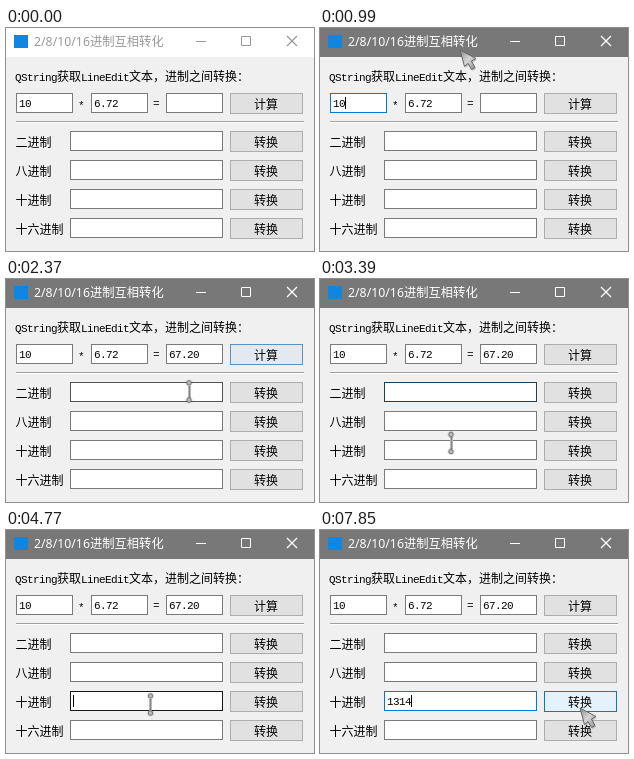
These frames come from a looping animation (308 by 223 pixels, 8000 ms). An HTML page:

```html
<!DOCTYPE html>
<html lang="zh-CN">
<head>
<meta charset="utf-8">
<title>2/8/10/16进制互相转化</title>
<style>
  html, body { margin: 0; width: 100%; height: 100%; overflow: hidden; background: #f0f0f0; }
  svg { display: block; width: 100vw; height: 100vh; }
  text { font-family: "Noto Sans CJK SC", "Noto Sans CJK", sans-serif; font-size: 12px; white-space: pre; }
  .latin { font-family: "Liberation Mono", monospace; font-size: 11px; letter-spacing: -.6px; }
  .title { font-family: "Noto Sans", "Noto Sans CJK SC", "Noto Sans CJK", sans-serif; font-size: 12.3px; }
</style>
</head>
<body>
<svg id="stage" viewBox="0 0 308 223">
  <defs>
    <linearGradient id="metal" x1="0" y1="0" x2="1" y2="1">
      <stop offset="0" stop-color="#8a8a8a"/>
      <stop offset=".5" stop-color="#d6d6d6"/>
      <stop offset="1" stop-color="#8c8c8c"/>
    </linearGradient>
  </defs>
</svg>
<script>
const LOOP = 8000;
const stage = document.getElementById('stage');

function el(tag, attrs, parent = stage) {
  const node = document.createElementNS('http://www.w3.org/2000/svg', tag);
  set(node, attrs);
  parent.appendChild(node);
  return node;
}

function set(node, attrs) {
  for (const key in attrs) node.setAttribute(key, attrs[key]);
}

function rect(x, y, width, height, fill, parent) {
  return el('rect', { x, y, width, height, fill, 'shape-rendering': 'crispEdges' }, parent);
}

// Half-width and full-width runs use different fonts.
function label(x, y, str) {
  const text = el('text', { x, y, fill: '#000' });
  for (const run of str.match(/[ -~]+|[^ -~]+/g) || []) {
    const span = el('tspan', /[ -~]/.test(run) ? { class: 'latin' } : {}, text);
    span.textContent = run;
  }
  return text;
}

function box(x, y, w, h, fill, stroke) {
  return el('rect', {
    x: x + .5, y: y + .5, width: w - 1, height: h - 1,
    fill, stroke, 'shape-rendering': 'crispEdges'
  });
}

function field(x, y, w) {
  const frame = box(x, y, w, 20, '#fff', '#7a7a7a');
  const text = el('text', { x: x + 3, y: y + 14, class: 'latin' });
  return { x, y, frame, text };
}

function button(y, str) {
  const frame = box(224, y, 73, 21, '#e1e1e1', '#adadad');
  label(248, y + 16, str);
  return frame;
}

// Title bar
rect(0, 0, 308, 223, '#f0f0f0');
const bar = rect(0, 0, 308, 29, '#fff');
rect(8, 7, 14, 13, '#0f86e0');
const title = el('text', { x: 28, y: 18, class: 'title' });
title.textContent = '2/8/10/16进制互相转化';
const controls = el('g', { fill: 'none', 'stroke-linejoin': 'bevel' });
el('path', { d: 'M190 13.5h10M235.5 8.5h9v9h-9z' }, controls);
el('path', { d: 'M281 8l10 10M291 8l-10 10', 'stroke-width': 1.3 }, controls);

// Form
label(9, 53, 'QString获取LineEdit文本，进制之间转换：');
const fields = { a: field(10, 65, 57), b: field(85, 65, 57), sum: field(160, 65, 57) };
label(72, 81, '*');
label(147, 79, '=');
const buttons = { calc: button(65, '计算') };
rect(10, 93, 288, 1, '#a0a0a0');
rect(10, 94, 288, 1, '#fff');
['二', '八', '十', '十六'].forEach((name, i) => {
  const y = 103 + i * 29;
  const key = ['bin', 'oct', 'dec', 'hex'][i];
  label(9.5, y + 16, name + '进制');
  fields[key] = field(64, y, 153);
  buttons[key] = button(y, '转换');
});
const caret = rect(0, 0, 1, 12, '#000');

// Pointers
const arrow = el('g', {});
const arrowPath = 'M0 0L16 8.5L11.5 11L15 17.5L11.5 19.5L8 13.5L4.5 16.5Z';
el('path', { d: arrowPath, transform: 'translate(1 1.5)', fill: '#000', opacity: .18 }, arrow);
el('path', { d: arrowPath, fill: 'url(#metal)', stroke: '#666', 'stroke-linejoin': 'round' }, arrow);

const beam = el('g', {});
rect(-1.5, -6, 3, 12, '#b8b8b8', beam);
rect(-.5, -6, 1, 12, '#858585', beam);
for (const cy of [-8.6, 8.6]) {
  el('circle', { cx: 0, cy, r: 3.5, fill: '#000', opacity: .12 }, beam);
  el('circle', { cx: 0, cy, r: 2.2, fill: '#b8b8b8', stroke: '#787878' }, beam);
}

// Border and fill looks
const BLUE = '#0078d7', DARK = '#171717', FADE = '#555';
const HOVER = ['#e5f1fb', BLUE], PRESSED = ['#cce4f7', '#005499'];
const HALF = ['#e3e9ee', '#5793c3'];

// Each step changes only the listed parts of the state.
const start = {
  active: false, arrow: null, beam: null, caret: null,
  edge: {}, look: {}, text: { a: '10', b: '6.72' }
};
const changes = [
  [0, {}],
  [660, { arrow: [144, 19] }],
  [990, { active: true, arrow: [140, 22], edge: { a: BLUE }, caret: 'a' }],
  [1340, { arrow: [252, 74], look: { calc: HALF } }],
  [1670, { arrow: [257, 80], look: { calc: HOVER }, caret: null }],
  [2020, { edge: {}, look: { calc: PRESSED }, text: { sum: '67.20' } }],
  [2370, { arrow: null, beam: [183, 112.5], edge: { bin: FADE }, look: { calc: HALF } }],
  [2710, { beam: [176.5, 117], edge: { bin: DARK }, look: {}, caret: 'bin' }],
  [3060, { beam: [176.5, 117.5] }],
  [3390, { beam: [131, 164], edge: { bin: '#173f60' }, caret: null }],
  [3740, { beam: [154.5, 164.5], edge: { bin: BLUE, dec: FADE }, caret: 'bin' }],
  [4090, { beam: [142.5, 167.5] }],
  [4420, { beam: [144.5, 174.5], edge: { dec: DARK }, caret: 'dec' }],
  [5110, { text: { dec: '1' } }],
  [5460, { text: { dec: '13' } }],
  [6140, { caret: null }],
  [6490, { text: { dec: '131' }, caret: 'dec' }],
  [6820, { text: { dec: '1314' } }],
  [7170, { caret: null }],
  [7520, { beam: null, arrow: [229, 175] }],
  [7850, { arrow: [260, 178], edge: { dec: BLUE }, look: { dec: HOVER }, caret: 'dec' }]
];
let last = start;
const steps = changes.map(([at, change]) => {
  last = { ...last, ...change, text: { ...last.text, ...change.text } };
  return { at, ...last };
});

function place(node, pos) {
  set(node, pos
    ? { visibility: 'visible', transform: `translate(${pos})` }
    : { visibility: 'hidden' });
}

function draw(time) {
  const state = steps.filter(step => step.at <= time).pop();
  const { active, edge, look, text } = state;
  set(bar, { fill: active ? '#787878' : '#fff' });
  set(title, { fill: active ? '#fff' : '#999' });
  set(controls, { stroke: active ? '#fff' : '#999' });
  for (const key in fields) {
    set(fields[key].frame, { stroke: edge[key] || '#7a7a7a' });
    fields[key].text.textContent = text[key] || '';
  }
  for (const key in buttons) {
    const [fill, stroke] = look[key] || ['#e1e1e1', '#adadad'];
    set(buttons[key], { fill, stroke });
  }
  const owner = fields[state.caret];
  place(caret, owner && [owner.x + 3 + 6 * (text[state.caret] || '').length, owner.y + 4]);
  place(arrow, state.arrow);
  place(beam, state.beam);
}

const t0 = performance.now();
function tick() {
  draw((performance.now() - t0) % LOOP);
  requestAnimationFrame(tick);
}
tick();
</script>
</body>
</html>
```
